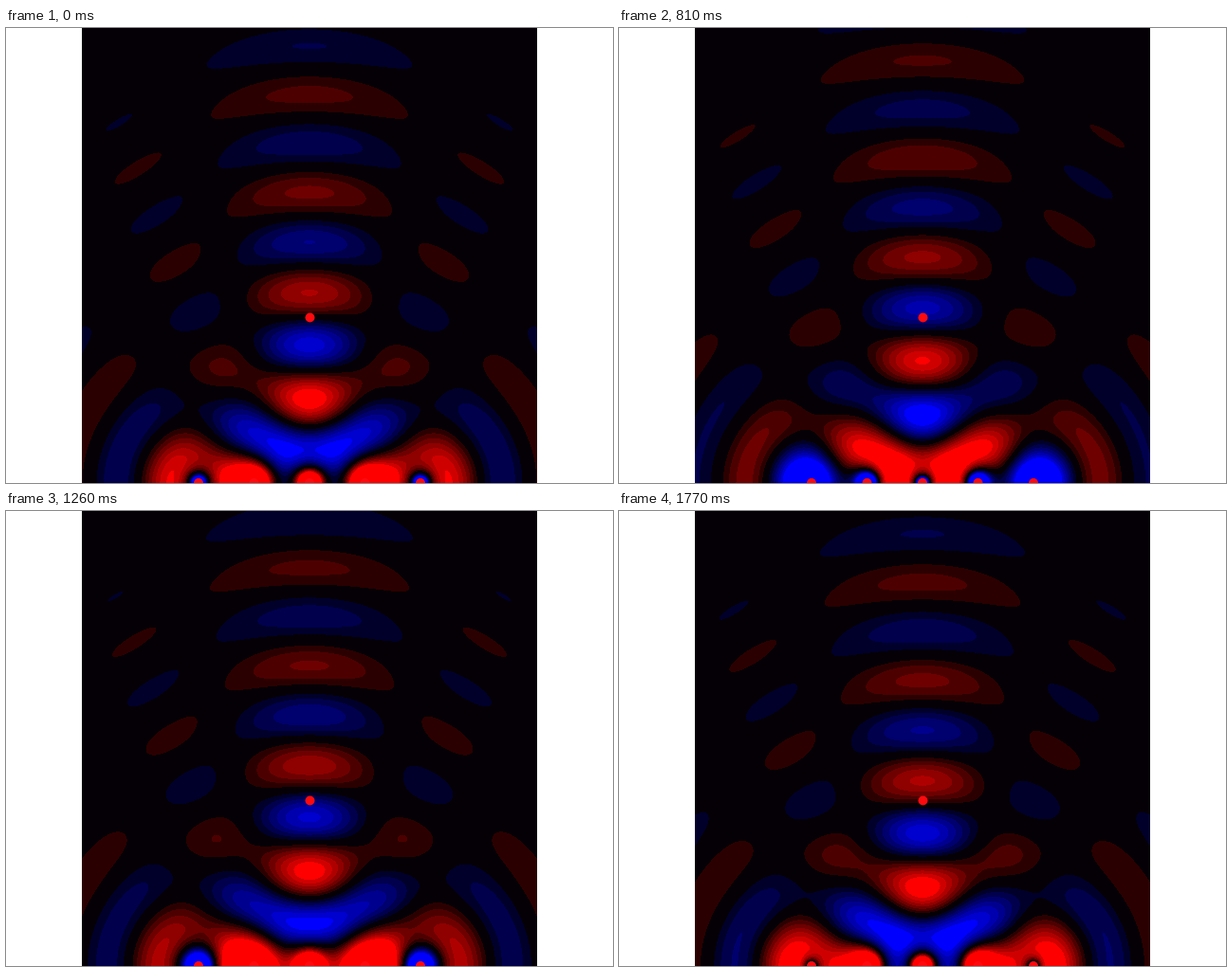
Animation, 640 px wide and 480 px high, one loop 1800 ms. Source, as an HTML page with a canvas:

```html
<!DOCTYPE html>
<html lang="en">
<head>
<meta charset="utf-8">
<title>Focused wave array</title>
<style>
  html, body { margin: 0; width: 100%; height: 100%; overflow: hidden; background: #fff; }
  canvas { position: absolute; left: 80px; top: 0; width: 480px; height: 480px; }
</style>
</head>
<body>
<canvas id="field" width="480" height="480"></canvas>
<script>
const SIZE = 480, WAVELENGTH = 100.5;
const STEP_MS = 30, STEPS = 20;
const LEVEL = 0.0045; // field strength per colour band
const SHADES = [0, 43, 77, 110, 143, 175, 207, 254];
const TOP = SHADES.length - 1;
const FOCUS = { x: 240.5, y: 305.5 };
const EMITTERS = [-2, -1, 0, 1, 2].map(i => ({ x: 240 + i * 58.5, y: SIZE }));

const ctx = document.getElementById('field').getContext('2d');
const k = 2 * Math.PI / WAVELENGTH;

// Little-endian RGBA
const rgb = (r, g, b) => (255 << 24 | b << 16 | g << 8 | r) >>> 0;
const black = rgb(5, 0, 6);
const reds = SHADES.map((s, i) => i ? rgb(s, 0, 0) : black);
const blues = SHADES.map((s, i) => i ? rgb(0, 0, s) : black);

// In-phase and quadrature parts of the summed spherical waves
const sinPart = new Float32Array(SIZE * SIZE);
const cosPart = new Float32Array(SIZE * SIZE);
for (const e of EMITTERS) {
  const delay = Math.hypot(e.x - 240, e.y - 305);
  for (let y = 0, p = 0; y < SIZE; y++) {
    for (let x = 0; x < SIZE; x++, p++) {
      const r = Math.hypot(x + 0.5 - e.x, y + 0.5 - e.y);
      const phase = k * (r - delay);
      sinPart[p] += Math.sin(phase) / r / LEVEL;
      cosPart[p] += Math.cos(phase) / r / LEVEL;
    }
  }
}

function render(step) {
  const image = ctx.createImageData(SIZE, SIZE);
  const pixels = new Uint32Array(image.data.buffer);
  const angle = 2 * Math.PI * step / STEPS;
  const c = Math.cos(angle), s = Math.sin(angle);
  for (let p = 0; p < pixels.length; p++) {
    const u = sinPart[p] * c - cosPart[p] * s;
    const band = Math.min(TOP, Math.floor(Math.abs(u)));
    pixels[p] = (u > 0 ? reds : blues)[band];
  }
  return image;
}

function dot({ x, y }) {
  ctx.beginPath();
  ctx.arc(x, y, 5, 0, 2 * Math.PI);
  ctx.fill();
}

const cache = [];
let shown = -1;

function tick() {
  const step = Math.floor(performance.now() / STEP_MS) % STEPS;
  if (step !== shown) {
    cache[step] ||= render(step);
    ctx.putImageData(cache[step], 0, 0);
    ctx.fillStyle = '#fc0a0e';
    [FOCUS, ...EMITTERS].forEach(dot);
    shown = step;
  }
  requestAnimationFrame(tick);
}
tick();
</script>
</body>
</html>
```
